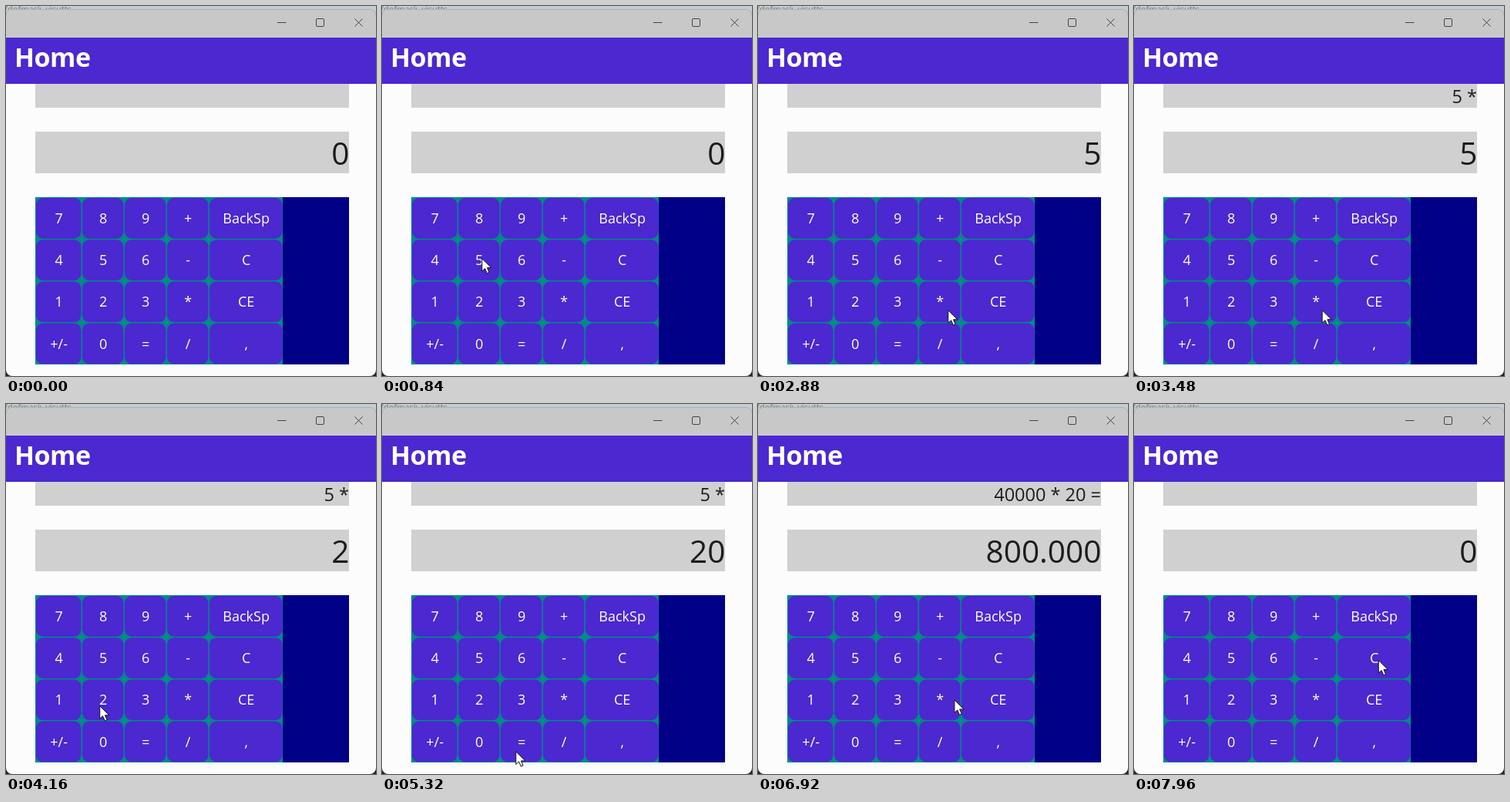
An HTML page that plays this animation: 480 px wide and 480 px high, repeating every 8 s.

```html
<!DOCTYPE html>
<html lang="en">
<head>
<meta charset="utf-8">
<title>Calculator</title>
<style>
  html, body { margin: 0; width: 100%; height: 100%; overflow: hidden; background: #fcfcfc; }
  svg { display: block; width: 100%; height: 100%; }
  text { font-family: "Open Sans", "Noto Sans", sans-serif; }
  .key { font-size: 18px; fill: #fff; text-anchor: middle; }
  .out { fill: #1c1c1c; text-anchor: end; }
</style>
</head>
<body>
<svg viewBox="0 0 480 480">
  <rect width="480" height="480" fill="#222"/>
  <rect width="480" height="20" fill="#c3cdd2"/>
  <text x="-2" y="8" font-size="11" fill="#777">/dofmask_visutts</text>
  <rect y="4.5" width="480" height="475.5" rx="8" fill="#fcfcfc"/>
  <path d="M0 41V12.5Q0 4.5 8 4.5H472Q480 4.5 480 12.5V41Z" fill="#c8c8c8"/>
  <path d="M0 12.5Q0 4.5 8 4.5H472Q480 4.5 480 12.5" fill="none" stroke="#a9b0b3"/>
  <path d="M352 21.5H363.5M452.5 16.5L462.5 26.5M462.5 16.5L452.5 26.5" stroke="#444" fill="none"/>
  <rect x="402.5" y="16.5" width="10" height="10" rx="1.5" stroke="#444" fill="none"/>
  <rect y="41" width="480" height="60" fill="#4b28d0"/>
  <text x="11" y="79" font-size="34" font-weight="700" letter-spacing="-.5" fill="#fff">Home</text>
  <path d="M38 101H445V132H38ZM38 163H445V217H38Z" fill="#d0d0d0"/>
  <text id="history" class="out" x="445" y="125.5" font-size="23.5"></text>
  <text id="display" class="out" x="445.3" y="205.5" font-size="40.5"></text>
  <rect x="38" y="248" width="407" height="217" fill="#000087"/>
  <rect x="38" y="248" width="321" height="217" fill="#00898a"/>
  <g id="keys"></g>
  <path id="cursor" d="M0 0V16.5L3.8 13L6.5 19.2L9.3 18L6.7 12H12Z" fill="#fff" stroke="#111" stroke-linejoin="round"/>
</svg>
<script>
const $ = id => document.getElementById(id);
const LOOP = 8000, TRAVEL = 480, PAUSE = 80;
const GAP = 1.5, KEY_HEIGHT = 52.7;

const rows = ["7 8 9 + BackSp", "4 5 6 - C", "1 2 3 * CE", "+/- 0 = / ,"];
const widths = [58.5, 53.5, 53.5, 53.5, 94.5];
const centers = {};

function add(tag, attrs, label = "") {
  const el = document.createElementNS("http://www.w3.org/2000/svg", tag);
  for (const name in attrs) el.setAttribute(name, attrs[name]);
  el.textContent = label;
  $("keys").append(el);
}

rows.forEach((row, r) => {
  const y = 249 + r * (KEY_HEIGHT + GAP);
  let x = 39;
  row.split(" ").forEach((label, c) => {
    const width = widths[c];
    centers[label] = [x + width / 2, y + KEY_HEIGHT / 2];
    add("rect", { x, y, width, height: KEY_HEIGHT, rx: 9, fill: "#4b28d0" });
    add("text", { class: "key", x: x + width / 2 + 0.4, y: y + 33 }, label);
    x += width + GAP;
  });
});

const cleared = { value: "0", history: "", fresh: true };

function press(state, key) {
  const { value, left, right, fresh } = state;
  if (key === "C") return cleared;
  if (key === "*") return { value, left: value, history: `${value} *`, fresh: true };
  if (key === "=") {
    const a = right ? value : left, b = right || value;
    return { value: String(a * b), right: b, history: `${a} * ${b} =`, fresh: true };
  }
  return { ...state, value: fresh ? key : value + key, fresh: false };
}

// Key, time of press, pointer offset from the key's centre
const clicks = [["5", 1760, 4, -2], ["*", 3360, 11, 11], ["2", 4150, -4, 8], ["0", 4760, -4, 9]];
for (let i = 0; i < 4; i++) clicks.push(["=", 5440 + i * 380, -7, 13]);
clicks.push(["C", 7560, 6, 3]);

// The pointer leaves for each key shortly after the previous press
let state = cleared, leave = PAUSE, from = [150, 482];
const states = [{ ...state, time: 0 }];
const moves = clicks.map(([key, time, dx, dy]) => {
  const [x, y] = centers[key];
  const move = { time: leave, from, to: [x + dx, y + dy] };
  state = press(state, key);
  states.push({ ...state, time });
  leave = time + PAUSE;
  from = move.to;
  return move;
});

const latest = (list, t) => list.filter(item => item.time <= t).pop() || list[0];
const smooth = u => u * u * (3 - 2 * u);

function draw(t) {
  const { value, history } = latest(states, t);
  $("history").textContent = history;
  $("display").textContent = Number(value).toLocaleString("de-DE");

  const { time, from, to } = latest(moves, t);
  const u = smooth(Math.max(0, Math.min(1, (t - time) / TRAVEL)));
  const [x, y] = from.map((v, i) => v + (to[i] - v) * u);
  $("cursor").setAttribute("transform", `translate(${x} ${y})`);
}

const began = performance.now();
function tick() {
  draw((performance.now() - began) % LOOP);
  requestAnimationFrame(tick);
}
tick();
</script>
</body>
</html>
```
